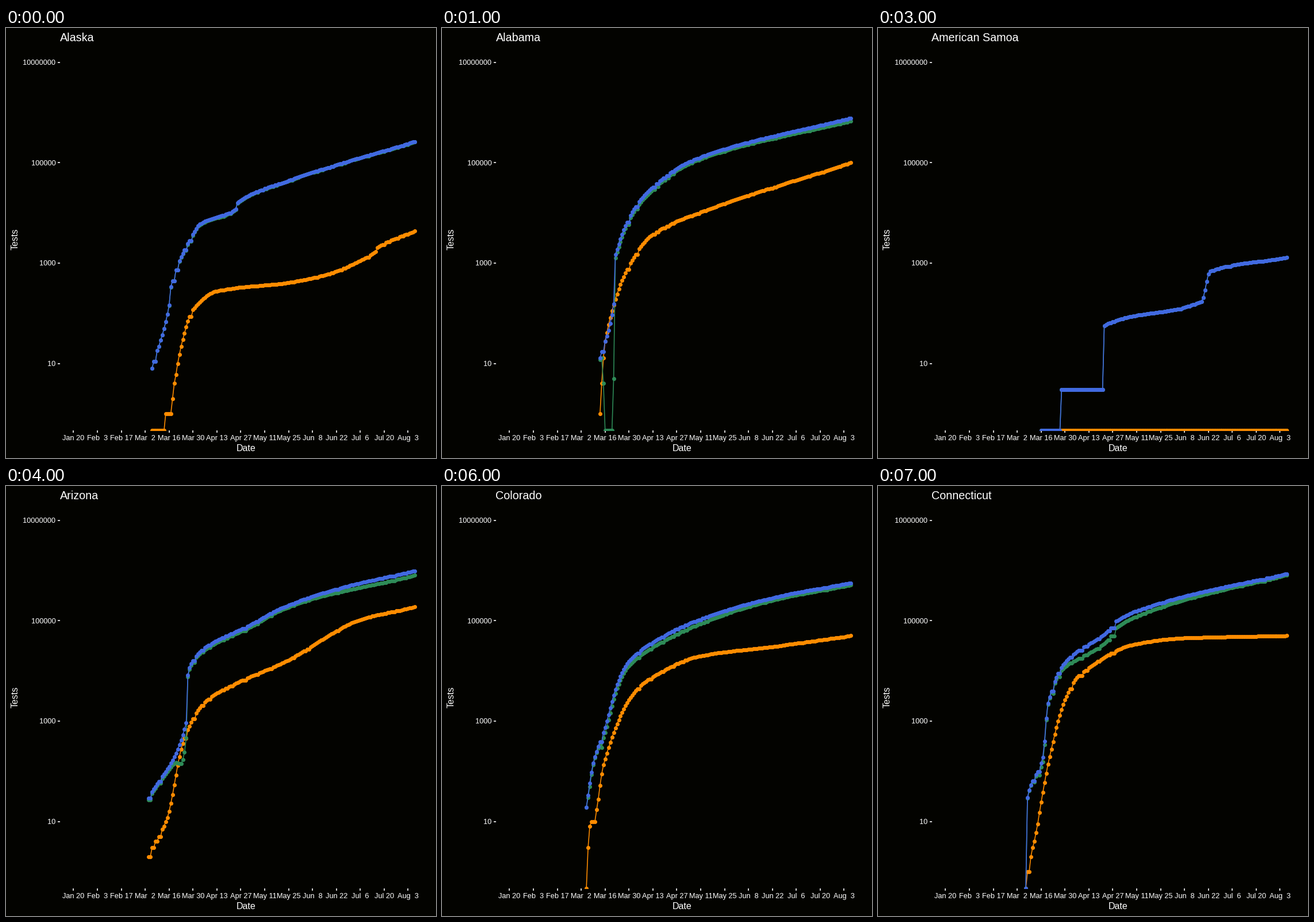
These frames come from a looping animation (748x748 px, 8 s). A matplotlib script:

```python
import numpy as np
import matplotlib.pyplot as plt
from matplotlib.animation import FuncAnimation
from matplotlib.patches import Rectangle

SIZE = 748
FLOOR = 700                   # zero counts sit on the panel edge
UNIT_Y, DECADE = 670.4, 87.3  # y of a count of 1, pixels per power of ten
DAY0_X, DAY_W = 117, 2.969    # x of Jan 20, pixels per day
LAST_DAY = 200
FORTNIGHTS = ("Jan 20,Feb  3,Feb 17,Mar  2,Mar 16,Mar 30,Apr 13,Apr 27,May 11,"
              "May 25,Jun  8,Jun 22,Jul  6,Jul 20,Aug  3").split(",")
states = []


def smooth(x, y, t):
    """Monotone cubic through the points (x, y), read at t."""
    width = np.diff(x)
    slope = np.diff(y) / width
    a, b = slope[:-1], slope[1:]
    inner = np.where(a * b > 0, 2 * a * b / np.where(a + b == 0, 1, a + b), 0)
    m = np.r_[slope[0], inner, slope[-1]]
    k = np.clip(np.searchsorted(x, t, "right") - 1, 0, len(width) - 1)
    w = width[k]
    u = (t - x[k]) / w
    return ((1 + 2 * u) * (1 - u) ** 2 * y[k] + u * (1 - u) ** 2 * w * m[k]
            + u ** 2 * (3 - 2 * u) * y[k + 1] + u ** 2 * (u - 1) * w * m[k + 1])


def daily_counts(knots, silent):
    """Whole counts per day along the knots; some days repeat the day before."""
    x, y = np.array(knots, float).T
    days = np.arange(int(x[0]), LAST_DAY + 1)
    counts = np.round(10 ** ((UNIT_Y - smooth(x, y, days)) / DECADE))
    for i in range(1, len(days)):
        if silent[days[i]] and counts[i] < 1.3 * counts[i - 1]:
            counts[i] = counts[i - 1]
    return days, counts


def to_y(counts):
    return np.where(counts < 1, FLOOR, UNIT_Y - DECADE * np.log10(np.maximum(counts, 1)))


def add_state(name, total, positive):
    """Knots are (day, height) pairs; negatives are what remains of the total."""
    silent = np.random.default_rng(len(states)).random(LAST_DAY + 1) < 0.2
    days, total = daily_counts(total, silent)
    _, positive = daily_counts(positive, silent)
    x = DAY0_X + DAY_W * days
    states.append((name, x, [to_y(positive), to_y(total - positive), to_y(total)]))


add_state("Alaska",
          [(46, 591), (56, 482), (57, 450), (70, 359), (74, 341), (95, 314),
           (96, 304), (126, 265), (200, 197)],
          [(46, 700), (52, 700), (56, 670), (63, 553), (70, 490), (84, 457),
           (131, 440), (177, 389), (178, 382), (200, 353)])
add_state("Alabama",
          [(53, 573), (61, 480), (62, 394), (84, 276), (112, 224), (200, 156)],
          [(53, 670), (56, 544), (70, 414), (84, 358), (112, 320), (200, 234)])
add_state("Arkansas",
          [(46, 602), (51, 576), (52, 541), (62, 413), (81, 300), (100, 264),
           (154, 198), (200, 169)],
          [(46, 700), (51, 700), (52, 602), (57, 553), (66, 450), (75, 420),
           (95, 371), (111, 358), (154, 304), (200, 262)])
add_state("American Samoa",
          [(56, 700), (67, 700), (68, 628), (92, 628), (93, 517), (150, 475),
           (155, 422), (200, 399)],
          [(56, 700), (200, 700)])
add_state("Arizona",
          [(44, 543), (66, 412), (67, 328), (69, 309), (76, 283), (105, 239),
           (121, 213), (154, 179), (200, 147)],
          [(44, 643), (55, 576), (64, 447), (75, 382), (84, 360), (126, 302),
           (168, 232), (200, 210)])
add_state("California",
          [(44, 433), (55, 401), (56, 328), (74, 273), (75, 229), (92, 192),
           (93, 176), (112, 148), (150, 105), (200, 66)],
          [(44, 520), (56, 449), (60, 406), (77, 307), (112, 249), (154, 212),
           (182, 182), (200, 170)])
add_state("Colorado",
          [(45, 558), (49, 482), (56, 419), (63, 345), (70, 305), (84, 271),
           (112, 231), (154, 194), (200, 168)],
          [(45, 700), (47, 591), (50, 576), (55, 485), (70, 372), (81, 337),
           (112, 295), (154, 279), (200, 260)])
add_state("Connecticut",
          [(47, 700), (48, 542), (57, 471), (60, 377), (70, 307), (98, 243),
           (99, 237), (126, 203), (200, 152)],
          [(47, 700), (53, 602), (61, 470), (70, 372), (78, 330), (112, 274),
           (140, 264), (200, 260)])

plt.rcParams["font.family"] = "Liberation Sans"
fig = plt.figure(figsize=(SIZE / 72, SIZE / 72), dpi=72, facecolor="#030300")
ax = fig.add_axes([0, 0, 1, 1])
# whole numbers fall on pixel centres
ax.set_xlim(-0.5, SIZE - 0.5)
ax.set_ylim(SIZE - 0.5, -0.5)
ax.axis("off")


def label(x, y, text, size, ha="center", **kw):
    return ax.text(x, y, text, fontsize=size, color="white", ha=ha,
                   va="baseline", **kw)


def tick(xs, ys):
    ax.plot(xs, ys, color="white", lw=1.6, solid_capstyle="butt")


for i, date in enumerate(FORTNIGHTS):
    x = DAY0_X + 14 * DAY_W * i
    tick([x, x], [700, 704])
    label(x, 717, date, 12.8)
for power in (1, 3, 5, 7):
    y = UNIT_Y - DECADE * power
    tick([89.5, 93.5], [y, y])
    label(86, y + 4.2, str(10 ** power), 12.8, ha="right")
label(417, 736, "Date", 16)
label(20, 367, "Tests", 16, rotation=90, rotation_mode="anchor")
title = label(93, 22.5, "", 19.7, ha="left")

panel = Rectangle((0, 0), SIZE, FLOOR, transform=ax.transData)
series = []
for color in ("darkorange", "seagreen", "royalblue"):
    line, = ax.plot([], [], "-o", color=color, lw=1.6, ms=7, mew=0)
    line.set_clip_path(panel)
    series.append(line)


def draw(i):
    name, x, heights = states[i]
    title.set_text(name)
    for line, y in zip(series, heights):
        line.set_data(x, y)
    return [title, *series]


anim = FuncAnimation(fig, draw, frames=len(states), interval=1000, repeat=True)
plt.show()
```
